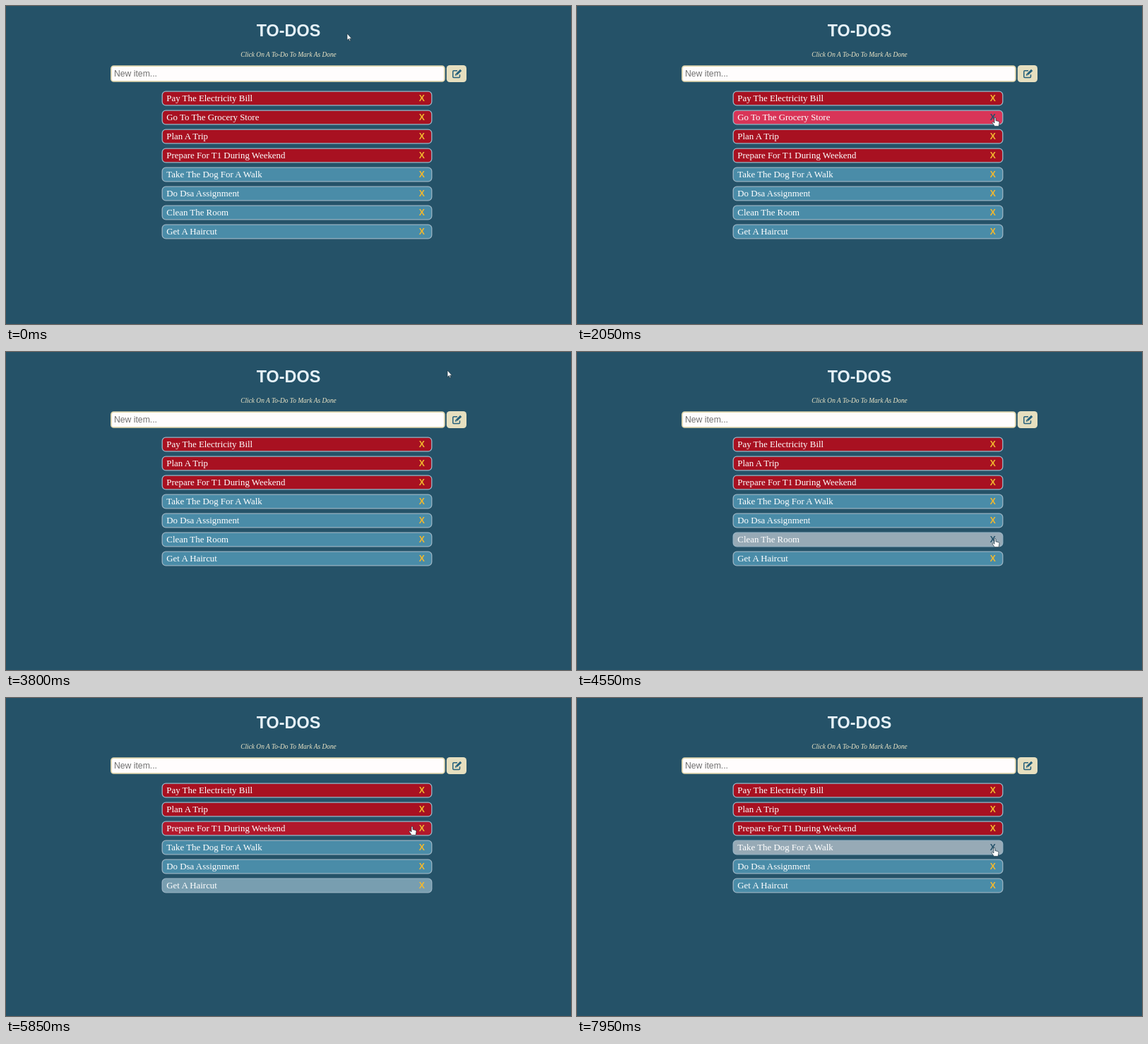
Write an HTML page that moves like this. It is 800 by 451 pixels and loops after 8000 ms.

```html
<!DOCTYPE html>
<html lang="en">
<head>
<meta charset="utf-8">
<title>To-dos</title>
<style>
  html, body { margin: 0; width: 100%; height: 100%; overflow: hidden; background: #255268; }
  svg { display: block; width: 100%; height: 100%; }
  .serif { font-family: "Liberation Serif", serif; }
  .sans { font-family: "Liberation Sans", sans-serif; }
  .item rect { stroke: #9ab5c5; stroke-width: 1.3; }
  .item .serif { font-size: 12.9px; fill: #fff; }
  .item .sans { font-size: 12.2px; font-weight: bold; }
</style>
</head>
<body>
<svg viewBox="0 0 800 451">
  <text class="sans" x="400" y="43" text-anchor="middle" font-size="23.4" font-weight="bold" fill="#e6f1f8">TO-DOS</text>
  <text class="serif" x="400" y="72.3" text-anchor="middle" font-size="9.4" font-style="italic" fill="#ece5c6">Click On A To-Do To Mark As Done</text>
  <rect x="149" y="85.1" width="471.8" height="21.8" rx="3.5" fill="#fffdfd" stroke="#e4dab2" stroke-width="1.8"/>
  <text class="sans" x="153" y="100" font-size="12.2" fill="#707070">New item...</text>
  <rect x="623.8" y="84" width="28.2" height="24" rx="4.5" fill="#e6dfbf"/>
  <g fill="none" stroke="#25607c" stroke-width="1.5">
    <path d="M639 91.7H634Q632.8 91.7 632.8 92.9V100.2Q632.8 101.4 634 101.4H641.3Q642.5 101.4 642.5 100.2V97.2"/>
    <path d="M637.8 97 644.2 90.8" stroke-width="3"/>
    <path d="M635.8 98.7 636.2 96 638.5 98.3Z" fill="#25607c" stroke="none"/>
  </g>
  <g id="list"></g>
  <path id="cursor" fill="#fff" stroke="#16303e" stroke-width=".7" stroke-linejoin="round"/>
</svg>
<script>
const LOOP = 8000, STEP = 50, FADE = 250, PITCH = 27;
const RED = [168, 17, 33], PINK = [217, 53, 88];
const BLUE = [74, 140, 168], GREY = [151, 170, 182];
const ARROW = 'M0 0V9.5L2.2 7.6 3.6 11 5 10.4 3.6 7.2H6.5Z';
const HAND = 'M-1 .8Q0-.8 1 .8V4.6L4.5 5.4Q6 5.8 6 7.2L5.2 12.4H-.6L-4 7.6Q-3.6 6-2.2 6.8L-1 8Z';

const todo = (label, done, end = Infinity) => ({ label, done, end });
const items = [
  todo('Pay The Electricity Bill', true),
  todo('Go To The Grocery Store', true, 2150),
  todo('Plan A Trip', true),
  todo('Prepare For T1 During Weekend', true),
  todo('Take The Dog For A Walk', false),
  todo('Do Dsa Assignment', false),
  todo('Clean The Room', false, 4850),
  todo('Get A Haircut', false)
];

// pointer stops: time, x, y; each move slows down as it arrives
const stops = [
  [0, 483, 39], [350, 642, 94], [500, 620, 308], [750, 610, 150],
  [1000, 567, 170], [1250, 560, 283], [1700, 588, 143], [1800, 592, 158],
  [2250, 592, 158], [2450, 560, 199], [2800, 560, 199], [3050, 246.5, 249],
  [3300, 300, 299], [3600, 640, 67], [3800, 625, 26], [4200, 612, 298],
  [4400, 592, 266], [5750, 592, 258], [5850, 575, 182], [6900, 580, 232],
  [7250, 560, 255], [7700, 591, 212], [LOOP, 591, 212]
];

const list = document.getElementById('list');
const cursor = document.getElementById('cursor');
for (const item of items) {
  list.insertAdjacentHTML('beforeend', `<g class="item">
    <rect x="221.2" y="121.2" width="381.6" height="19.6" rx="5"/>
    <text class="serif" x="227.3" y="135">${item.label}</text>
    <text class="sans" x="584.7" y="134.7">X</text></g>`);
  item.node = list.lastElementChild;
  [item.box, , item.cross] = item.node.children;
}

function pointer(t) {
  const i = stops.findIndex(stop => stop[0] > t);
  const [t0, x0, y0] = stops[i - 1], [t1, x1, y1] = stops[i];
  const k = 1 - ((t1 - t) / (t1 - t0)) ** 2;
  return [x0 + (x1 - x0) * k, y0 + (y1 - y0) * k];
}

const visible = t => items.filter(item => t < item.end);

function hovered(t) {
  const [x, y] = pointer(t);
  const offset = y - 120.5;
  if (x < 220.5 || x > 603.5 || offset < 0 || offset % PITCH > 21.2) return;
  return visible(t)[Math.floor(offset / PITCH)];
}

const mix = (a, b, k) => `rgb(${a.map((v, i) => Math.round(v + (b[i] - v) * k))})`;

function draw(t) {
  // replay hover fades up to t
  for (const item of items) item.glow = 0;
  for (let s = 0; s <= t; s += STEP) {
    const target = hovered(s);
    for (const item of items) {
      const change = item === target ? STEP / FADE : -STEP / FADE;
      item.glow = Math.min(1, Math.max(0, item.glow + change));
    }
  }
  const [x, y] = pointer(t), target = hovered(t);
  const rows = visible(t);
  for (const item of items) {
    const row = rows.indexOf(item);
    item.node.style.display = row < 0 ? 'none' : '';
    item.node.setAttribute('transform', `translate(0 ${row * PITCH})`);
    item.box.setAttribute('fill', item.done ? mix(RED, PINK, item.glow) : mix(BLUE, GREY, item.glow));
    const onCross = item === target && x > 583 && x < 595;
    item.cross.setAttribute('fill', onCross ? '#25526a' : '#f2b92e');
  }
  const onButton = x > 624 && x < 652 && y > 84 && y < 108;
  cursor.setAttribute('d', target || onButton ? HAND : ARROW);
  cursor.setAttribute('transform', `translate(${x} ${y})`);
}

const start = performance.now();
function tick() {
  const t = (performance.now() - start) % LOOP;
  draw(Math.floor(t / STEP) * STEP);
  requestAnimationFrame(tick);
}
tick();
</script>
</body>
</html>
```
